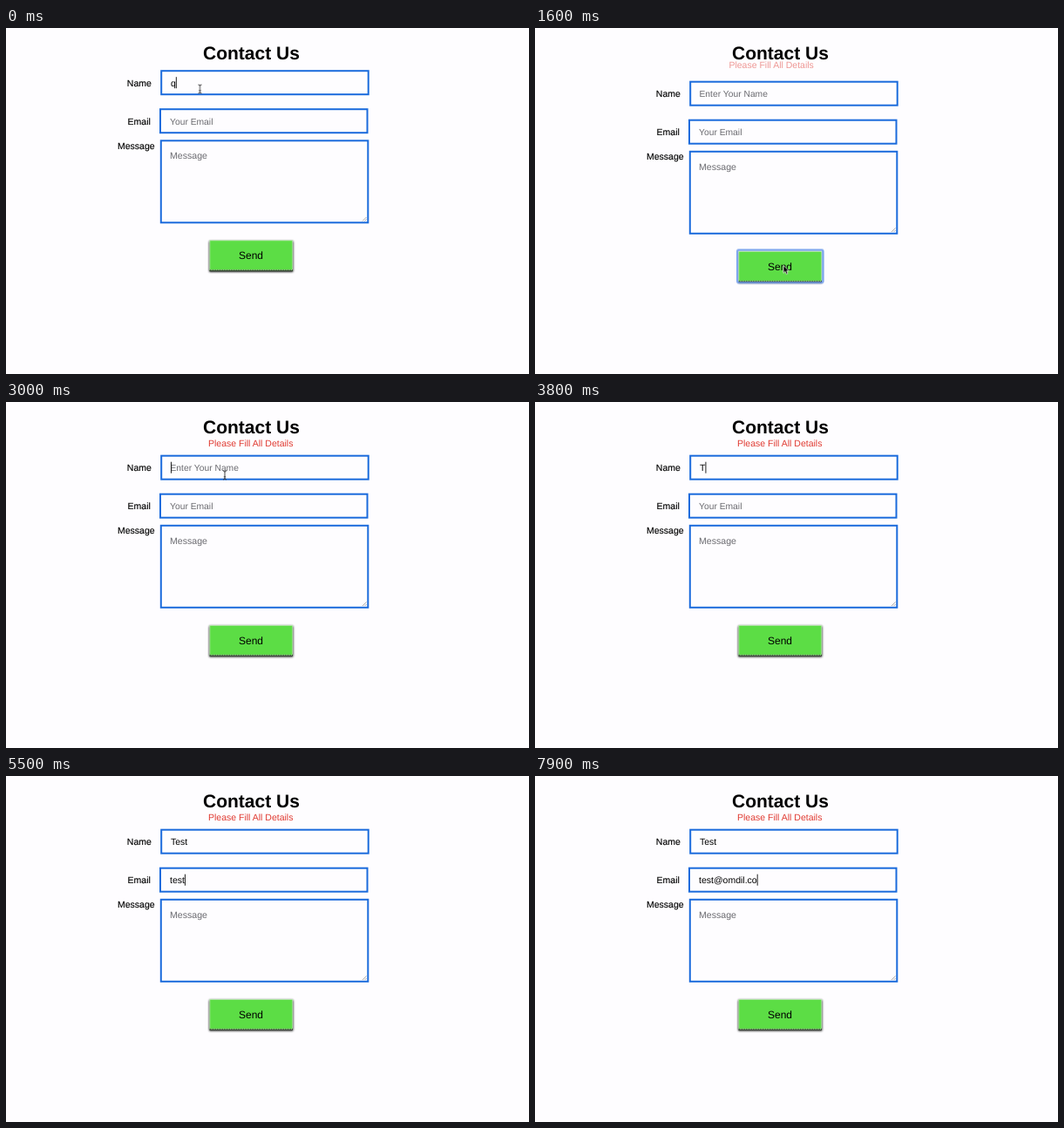
These frames come from a looping animation (600 by 397 pixels, 8000 ms). An HTML page:

```html
<!DOCTYPE html>
<html lang="en">
<head>
<meta charset="utf-8">
<title>Contact form</title>
<style>
  html, body { margin: 0; width: 100%; height: 100%; overflow: hidden; background: #fefdff; }
  svg { display: block; width: 600px; height: 397px; }
  text { font: 10.5px "Liberation Sans", Arial, sans-serif; text-rendering: geometricPrecision; white-space: pre; }
  .title { font-size: 21px; font-weight: bold; }
  .send { font-size: 12px; }
  .label { stroke: #000; stroke-width: .15px; }
  .hint { font-size: 10.3px; fill: #6b6b70; }
  .box { fill: #fefdff; stroke: #1b6bdc; stroke-width: 2; }
  .error { fill: #e03a31; }

  .form, .error, .ring, .shade, .mouse, .arrow, .beam { animation: 8s linear infinite; }
  .form { animation-name: drop; animation-timing-function: step-end; }
  .error { animation-name: slide; }
  .ring { animation-name: focus; animation-timing-function: step-end; }
  .mouse { animation-name: travel; }
  .arrow { animation-name: arrow; animation-timing-function: step-end; }
  .beam { animation-name: beam; animation-timing-function: step-end; }

  @keyframes drop {
    0% { transform: none; }
    18.1%, 100% { transform: translateY(12.5px); }
  }
  @keyframes slide {
    0%, 18.1% { opacity: 0; transform: translate(-20px, -10px); animation-timing-function: ease; }
    24.4%, 100% { opacity: 1; transform: none; }
  }
  @keyframes focus {
    0% { opacity: 0; }
    17.5% { opacity: 1; }
    36.25%, 100% { opacity: 0; }
  }
  @keyframes travel {
    0%, 4% { transform: translate(222.5px, 70px); animation-timing-function: ease-in-out; }
    11% { transform: translate(272px, 306px); animation-timing-function: ease-in-out; }
    15%, 16% { transform: translate(286px, 276px); }
    18%, 21.5% { transform: translate(285px, 272.5px); animation-timing-function: ease-in-out; }
    28%, 100% { transform: translate(251px, 84px); }
  }
  @keyframes arrow {
    0% { opacity: 0; }
    8.4% { opacity: 1; }
    23.4%, 100% { opacity: 0; }
  }
  @keyframes beam {
    0% { opacity: 1; }
    8.4% { opacity: 0; }
    23.4% { opacity: 1; }
    46.2%, 100% { opacity: 0; }
  }
</style>
</head>
<body>
<svg viewBox="0 0 600 397">
  <defs>
    <filter id="soft" x="-10%" y="-20%" width="120%" height="150%"><feGaussianBlur stdDeviation=".8"/></filter>
  </defs>

  <text class="title" x="226" y="36">Contact Us</text>

  <g class="form">
    <text class="label" x="138.8" y="66.5">Name</text>
    <text class="label" x="139.6" y="110.5">Email</text>
    <text class="label" x="128" y="138.7">Message</text>

    <rect class="box" x="178.2" y="49.2" width="237.5" height="27"/>
    <rect class="box" x="177" y="93.2" width="237.5" height="27"/>
    <rect class="box" x="177.8" y="129.3" width="237.5" height="94"/>
    <path d="M409 221.5l4.5-4.5M411.5 221.5l2-2" stroke="#888" stroke-width=".7"/>

    <text class="hint" id="nameHint" x="188.5" y="66.5">Enter Your Name</text>
    <text class="hint" id="emailHint" x="188" y="110.5">Your Email</text>
    <text class="hint" x="188" y="150" style="font-size:10.6px">Message</text>
    <text id="name" x="189" y="66.5"></text>
    <text id="email" x="188" y="110.5"></text>
    <rect id="caret" width="1" height="13" fill="#222"/>

    <rect x="233" y="244.5" width="96.5" height="35.5" rx="1" fill="#222" filter="url(#soft)"/>
    <rect x="233.5" y="276" width="95.5" height="3.2" fill="#1c2a1a"/>
    <g class="ring">
      <rect x="232.3" y="242.3" width="98" height="37.2" rx="1.5" fill="none" stroke="#7ea6ee" stroke-width="2.6"/>
      <path d="M233.5 278.6h95.5" stroke="#3d5a8a" stroke-width="1.4"/>
    </g>
    <rect x="233.8" y="243.8" width="95" height="34" fill="#5cdd45" stroke="#c5ecbd" stroke-width=".8"/>
    <path d="M234 277.8h95" stroke="#234a1c" stroke-width="1" stroke-dasharray="1 1"/>
    <text class="send" x="267" y="265.2">Send</text>
  </g>

  <text class="error" x="232" y="50.8">Please Fill All Details</text>

  <g class="mouse">
    <path class="arrow" d="M0 0v8.6l2-1.9 1.4 3.2 1.7-.7-1.4-3.1h2.7z" fill="#000" stroke="#fff" stroke-width=".7"/>
    <path class="beam" d="M-2-5q2 0 2 1.4q0-1.4 2-1.4M0-4v8M-2 5q2 0 2-1.4q0 1.4 2 1.4M-1.2 1.8h2.4" fill="none" stroke="#333" stroke-width=".9"/>
  </g>
</svg>
<script>
  const LOOP = 8000, BLINK = 530;
  const $ = id => document.getElementById(id);
  const fields = { name: $("name"), email: $("email") };
  const hints = { name: $("nameHint"), email: $("emailHint") };
  const caret = $("caret");

  // Each step: time, focused field, its text (undefined keeps it).
  const steps = [
    [0, "name", "q"], [150, "name", ""], [1400, null],
    [2900, "name"],
    ...typing("name", "Test", [3700, 3950, 4100, 4300]),
    [4700, "email"],
    ...typing("email", "test@omdil.co",
      [4900, 5050, 5250, 5430, 6100, 6500, 6700, 6880, 7030, 7200, 7450, 7680, 7850])
  ];

  function typing(field, text, times) {
    return times.map((time, i) => [time, field, text.slice(0, i + 1)]);
  }

  function draw(t) {
    const values = { name: "", email: "" };
    let focus = null, last = 0;
    for (const [time, field, text] of steps) {
      if (time > t) break;
      focus = field;
      last = time;
      if (text !== undefined) values[field] = text;
    }
    for (const key in fields) {
      if (fields[key].textContent !== values[key]) fields[key].textContent = values[key];
      hints[key].style.opacity = values[key] ? 0 : 1;
    }
    const on = focus && (t - last) % (2 * BLINK) < BLINK;
    caret.style.opacity = on ? 1 : 0;
    if (on) {
      const field = fields[focus];
      const width = values[focus] ? field.getComputedTextLength() : 0;
      caret.setAttribute("x", +field.getAttribute("x") + width);
      caret.setAttribute("y", field.getAttribute("y") - 10.3);
    }
  }

  let start;
  function tick(now) {
    start ??= now;
    draw((now - start) % LOOP);
    requestAnimationFrame(tick);
  }
  draw(0);
  requestAnimationFrame(tick);
</script>
</body>
</html>
```
